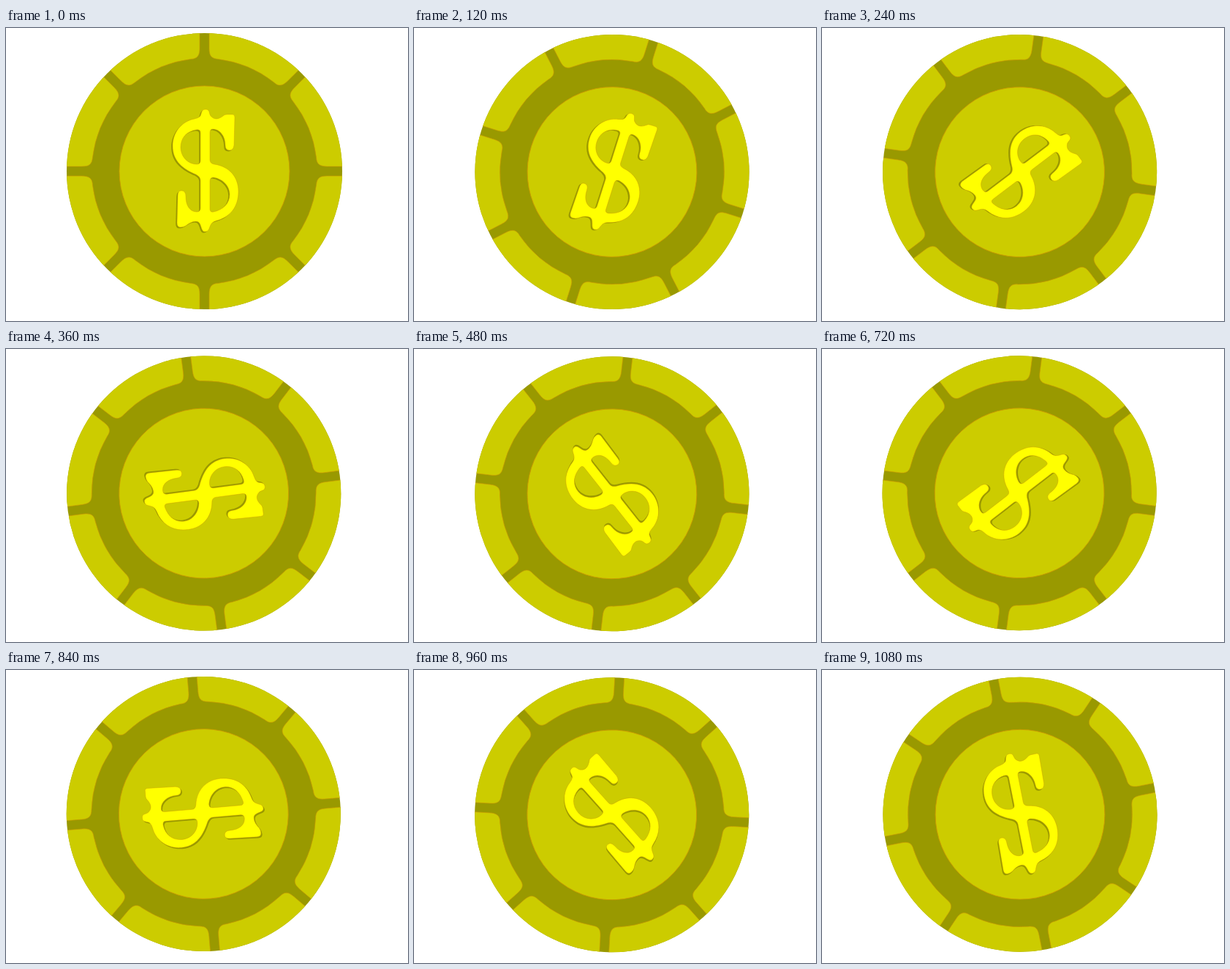
These frames come from a looping animation (550 px wide and 400 px high, 1.12 s). An HTML page:

```html
<!DOCTYPE html>
<html lang="en">
<head>
<meta charset="utf-8">
<title>Spinning coin</title>
<style>
  html, body { margin: 0; width: 100%; height: 100%; overflow: hidden; background: #fff; }
  svg { display: block; width: 100%; height: 100%; }
</style>
</head>
<body>
<svg viewBox="0 0 550 400">
  <defs>
    <clipPath id="rim"><circle r="188.5"/></clipPath>
    <!-- one of the eight rim panels, clockwise from the top -->
    <path id="panel" d="M6.5-200V-168C6.5-158 9-154 19-153
      A154 154 0 0 1 94.8-121.6C101.6-115.2 107.1-116.3 114.2-123.4L136.8-146L110-230Z"/>
    <path id="dollar" fill-rule="evenodd" transform="translate(-271.5 -195.5)" d="
      M265 121C268 119 266 111 273 111C280 111 277 118 281 121C286 126 292 124 297 120
      Q299 118 302 118H310Q313 118 313 122L312 160Q311 167 306 167Q300 167 300 160
      C300 147 292 138 283 138Q279 138 279 143V180Q279 185 285 186
      C306 189 318 204 318 223C318 244 307 258 288 263C276 266 281 277 273 278
      C265 279 269 264 260 264C254 264 250 267 246 270Q243 272 239 272Q234 272 234 266
      L235 229Q235 222 240 222Q246 222 246 230C246 243 252 251 261 251Q266 251 266 246
      V208Q266 203 260 200C241 192 228 181 228 161C228 142 241 127 258 124Q263 123 265 121Z
      M266 143Q266 138 260 139C247 141 239 150 239 163C239 176 249 186 261 186Q266 186 266 181Z
      M279 209Q279 204 284 204C297 206 306 216 306 227C306 240 297 248 284 251Q279 252 279 247Z"/>
  </defs>
  <g id="coin">
    <g clip-path="url(#rim)">
      <circle r="190" fill="#990"/>
      <g id="panels" fill="#cc0" stroke="#c90" stroke-width=".6"></g>
    </g>
    <circle r="116.5" fill="#cc0" stroke="#c90" stroke-width=".8"/>
    <use href="#dollar" x="-1.8" y="1.6" fill="#990"/>
    <use href="#dollar" fill="#ff0" stroke="#c90" stroke-width=".4"/>
  </g>
</svg>
<script>
  const coin = document.getElementById('coin');
  document.getElementById('panels').innerHTML = Array.from({ length: 8 },
    (_, i) => `<use href="#panel" transform="rotate(${i * 45})"/>`).join('');

  const LOOP = 1120, HOLD = 120;
  // Stepped, slightly wobbling turn: angle, centre x, centre y
  const poses = [
    [0, 271.5, 195.5], [17.6, 271, 196.5], [52.9, 270.6, 196.6], [82.5, 270.7, 197],
    [141.6, 270.9, 197.8], [172, 270.6, 197.4], [232.4, 270.1, 196.7],
    [265.2, 270.3, 196.5], [318.2, 270.7, 197.8], [348.8, 271, 197.2]
  ];

  const start = performance.now();
  function draw() {
    const time = (performance.now() - start) % LOOP;
    const step = Math.floor(time / HOLD);
    const [angle, x, y] = poses[step];
    coin.setAttribute('transform',
      `translate(${x} ${y}) rotate(${angle}) scale(${step ? 0.995 : 1})`);
    requestAnimationFrame(draw);
  }
  draw();
</script>
</body>
</html>
```
